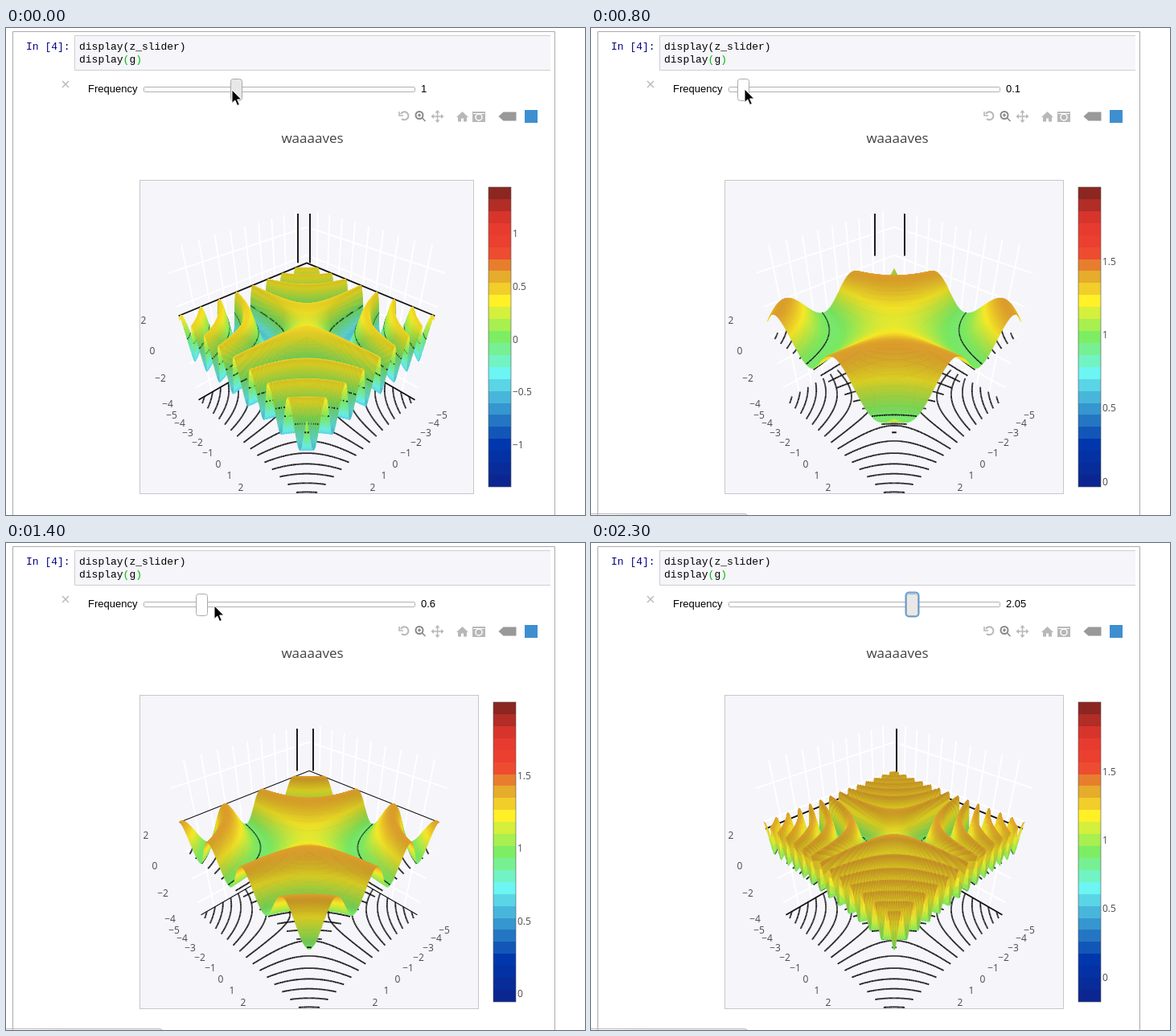
An HTML page with a canvas for the animation above (2.4 s loop, 720 by 606 pixels).

```html
<!DOCTYPE html>
<html lang="en">
<head>
<meta charset="utf-8">
<title>Frequency slider and 3D waves</title>
<style>
html, body { margin: 0; width: 720px; height: 606px; overflow: hidden; background: #fff; }
canvas, svg { position: absolute; left: 0; top: 0; display: block; }
.code { font: 13px "Liberation Mono", "Courier New", monospace; white-space: pre; }
.ui { font: 13px "Liberation Sans", Arial, sans-serif; fill: #000; }
.label { font: 12px "Open Sans", sans-serif; fill: #4a4a4a; }
.title { font: 17px "Open Sans", sans-serif; fill: #444; text-anchor: middle; }
.mid { text-anchor: middle; }
.match { fill: #0b0; }
</style>
</head>
<body>
<canvas id="plot" width="720" height="606"></canvas>
<svg width="720" height="606" viewBox="0 0 720 606">
  <path d="M8.5 606V4.5H682.5V606" fill="none" stroke="#ababab"/>
  <rect x="85" y="10" width="592" height="43" fill="#f5f5fa"/>
  <path d="M677 9.5H85.5V52.5H677" fill="none" stroke="#cfcfcf"/>
  <text class="code" x="25" y="27" fill="#000080">In [4]:</text>
  <text class="code" x="91" y="27">display(z_slider)</text>
  <text class="code" x="91" y="43">display<tspan class="match">(</tspan>g<tspan class="match">)</tspan></text>
  <path d="M70 66l8 8m0-8l-8 8" stroke="#bbb" stroke-width="1.5"/>
  <text class="ui" x="102" y="80">Frequency</text>
  <rect x="171.5" y="73.5" width="337" height="6" rx="1" fill="#fff" stroke="#b0b0b0"/>
  <rect id="glow" x="391.5" y="61.5" width="16" height="30" rx="4" fill="none" stroke="#5b9dd9" stroke-width="2"/>
  <rect id="handle" y="63.5" width="14" height="27" rx="3" stroke="#aaa"/>
  <text class="ui" id="value" x="516" y="80"></text>

  <g fill="none" stroke="#b8b8b8" stroke-width="2">
    <path d="M491 107a5 5 0 1 1 1 6"/>
    <path d="M489 104v5h5" stroke-width="1.6"/>
    <g stroke="#888"><circle cx="514" cy="108.5" r="4.5"/><path d="M517.5 112l4 4M512 108.5h4M514 106.5v4" stroke-width="1.6"/></g>
    <path d="M530 110h13M536.5 103.500v13" stroke-width="1.5"/>
  </g>
  <g fill="#b8b8b8">
    <path d="M536.5 102l3 3.500h-6zM536.5 118l3-3.500h-6zM528.5 110l3.500-3v6zM544.5 110l-3.500-3v6z"/>
    <path d="M560 111l7.500-7 7.500 7h-2v5.500h-4v-4h-3v4h-4V111z"/>
    <path d="M580 104h16v13h-16z"/>
    <path d="M612.5 110l6-5.500h16v11h-16z" fill="#999"/>
  </g>
  <circle cx="588" cy="111" r="4" fill="#b8b8b8" stroke="#fff" stroke-width="1.5"/>
  <path d="M581 106.500h14" stroke="#fff"/>
  <rect x="645" y="102" width="16" height="16" fill="#3e8fd0"/>
  <text class="title" x="381" y="143">waaaaves</text>

  <g id="labels"></g>
  <path id="status" d="M0 604.500H191q4 0 4 4" fill="#eee" stroke="#bbb"/>
  <path id="cursor" d="M0 0V16.500L3.800 13L6.600 19.500L9.400 18.300L6.600 12H11.800Z" fill="#000" stroke="#fff"/>
</svg>
<script>
const $ = id => document.getElementById(id);
const ctx = $('plot').getContext('2d');
const LOOP = 2400, STEP = 100, N = 150;
const TOP = 190, BOTTOM = 579, LEFT = 166, MID_Y = 385;
const BAR = { y: 198, h: 373, bands: 25 };
const FLOOR = -5.1, CEIL = 5, SHEET = .05;

// Rows: time, then values, joined linearly.
const sliderKeys = [[0, 1], [100, 1], [300, .8], [600, .3], [900, 0], [1100, 0], [1400, .6], [1900, 1.65], [2300, 2.05]];
const waveKeys = [[0, 1], [200, 1], [300, .95], [600, .45], [1000, 0], [1100, 0], [1400, .45], [1900, 1.15], [2300, 1.7]];
const cursorKeys = [[0, 281, 77], [300, 260, 77], [600, 206, 74], [1000, 176, 78], [1400, 259, 78], [1900, 358, 70], [2300, 399, 74]];
// Rows: start time, offsets of the two corner lines, width and height of the rear edge line.
const traceSteps = [[0, -11, 4, 1.8, 1.41], [200, -11, 1, 1.8, 1.5], [500, -24, 13, 0, 1.95], [1000, -4, 1, 1.6, 1], [1200, -15, 5, 1.1, 1.95], [1700, -15, 5, 1.8, 1.45], [2200, 3, 3, 1.8, 1.55]];
const jet = [[0, 12, 38, 145], [.125, 0, 55, 172], [.375, 108, 245, 242], [.5, 125, 238, 100], [.625, 255, 240, 40],
  [.72, 226, 162, 45], [.8, 238, 66, 48], [.9, 230, 56, 46], [1, 140, 38, 32]];

function lerpRows(rows, t) {
  let i = 1;
  while (i < rows.length - 1 && rows[i][0] < t) i++;
  const a = rows[i - 1], b = rows[i];
  const k = Math.min(1, Math.max(0, (t - a[0]) / (b[0] - a[0])));
  return a.slice(1).map((v, n) => v + (b[n + 1] - v) * k);
}
const snap = v => Math.round(v * 20) / 20;
const rgb = (t, shade = 1) => `rgb(${lerpRows(jet, t).map(c => Math.round(c * shade))})`;

// Perspective view from above the near corner; x and y run from -1 to 1.
function project(x, y, z, cx) {
  const p = (x - y) / 2, q = (x + y) / 2, lift = .0015 + .0273 * z;
  const w = 1 - .2752 * q - lift;
  return [cx + 153 * p / w, MID_Y + (88.8 * q - 641.6 * lift) / w];
}

const grid = i => -1 + 2 * i / N;

// Zero lines of sin(25xy) + cos(25xy), cut into pieces per grid cell.
function levelLines() {
  const cells = [];
  for (let i = 0; i < N; i++) for (let j = 0; j < N; j++) {
    const list = cells[i * N + j] = [];
    const a = grid(i), b = grid(i + 1), c = grid(j), d = grid(j + 1);
    const corners = [[a, c], [b, c], [b, d], [a, d]];
    for (let n = -7; n <= 8; n++) {
      const level = Math.PI * (n - .25) / 25, hits = [];
      corners.forEach(([x0, y0], k) => {
        const [x1, y1] = corners[(k + 1) % 4];
        const u = x0 * y0 - level, v = x1 * y1 - level;
        if ((u < 0) !== (v < 0)) {
          const m = u / (u - v);
          hits.push([x0 + (x1 - x0) * m, y0 + (y1 - y0) * m]);
        }
      });
      for (let k = 0; k + 1 < hits.length; k += 2) list.push([hits[k], hits[k + 1]]);
    }
  }
  return cells;
}
const levels = levelLines();

function line(points, color, width) {
  ctx.beginPath();
  points.forEach(([x, y], i) => i ? ctx.lineTo(x, y) : ctx.moveTo(x, y));
  ctx.strokeStyle = color;
  ctx.lineWidth = width;
  ctx.stroke();
}

function drawRoom(cx, [, left, right, width, peak]) {
  const at = (x, y, z) => project(x, y, z, cx);
  const rear = z => [at(-1, 1, z), at(-1, -1, z), at(1, -1, z)];
  for (let u = -.8; u < .9; u += .2) {
    line([at(u, -1, FLOOR), at(u, -1, CEIL + .25)], '#fff', 2);
    line([at(-1, u, FLOOR), at(-1, u, CEIL + .25)], '#fff', 2);
  }
  for (let z = -4; z <= 4; z += 2) line(rear(z), '#fff', 2);
  levels.forEach(list => list.forEach(([a, b]) => line([at(...a, FLOOR), at(...b, FLOOR)], '#111', 1.8)));
  const base = at(-1, -1, peak)[1];
  [left, right].forEach(dx => line([[cx + dx, 231], [cx + dx, base]], '#111', 1.9));
  if (width) {
    line(rear(FLOOR), '#111', width);
    line(rear(peak), '#111', width);
  }
}

function drawSurface(cx, height) {
  const pts = [], zs = [];
  for (let i = 0; i <= N; i++) for (let j = 0; j <= N; j++) {
    const x = grid(i), y = grid(j), z = height(x * y), k = i * (N + 1) + j;
    zs[k] = z;
    pts[k] = project(x, y, z, cx);
  }
  // Diagonal rows from back to front.
  for (let s = 0; s <= 2 * N - 2; s++) {
    for (let i = Math.max(0, s - N + 1); i <= Math.min(s, N - 1); i++) {
      const j = s - i, a = i * (N + 1) + j, b = a + N + 1;
      const quad = [a, b, b + 1, a + 1];
      const z = quad.reduce((sum, k) => sum + zs[k], 0) / 4;
      const marks = () => levels[i * N + j].forEach(([m, n]) =>
        line([project(...m, SHEET, cx), project(...n, SHEET, cx)], '#111', 1.8));
      if (z >= SHEET) marks();
      const drop = (zs[a] - zs[b + 1]) * N / 10;
      const color = rgb(.49 + .115 * z, .97 - .13 * Math.max(0, Math.min(1, drop / 2)));
      ctx.fillStyle = color;
      line([...quad, a].map(k => pts[k]), color, .8);
      ctx.fill();
      if (z < SHEET) marks();
    }
  }
}

function drawBar(x) {
  const h = BAR.h / BAR.bands;
  for (let i = 0; i < BAR.bands; i++) {
    ctx.fillStyle = rgb(1 - i / (BAR.bands - 1));
    ctx.fillRect(x, Math.round(BAR.y + i * h), 28, Math.ceil(h));
  }
  ctx.strokeStyle = '#555';
  ctx.lineWidth = .6;
  ctx.strokeRect(x, BAR.y, 28, BAR.h);
}

function labelMarkup(cx, barX, lo, hi, gap) {
  const out = [];
  const put = (x, y, v, cls = 'label mid') =>
    out.push(`<text class="${cls}" x="${x}" y="${y + 4}">${String(v).replace('-', '−')}</text>`);
  [[-203, 364], [-192, 402], [-182, 436], [-173, 468]].forEach(([dx, y], i) => put(cx + dx, y, 2 - 2 * i));
  [[168, 482], [158, 492], [148, 504], [136, 516], [123, 529], [110, 543], [96, 557], [82, 572]].forEach(([dx, y], i) => {
    put(cx - dx, y, i - 5);
    put(cx + dx, y, i - 5);
  });
  for (let n = Math.ceil(lo / gap); n * gap <= hi + 1e-9; n++) {
    const v = +(n * gap).toFixed(3);
    put(barX + 30, BAR.y + (hi - v) / (hi - lo) * BAR.h + 2, v, 'label');
  }
  return out.join('');
}

function drawPlot(t) {
  const f = snap(lerpRows(waveKeys, t)[0]);
  const first = t < 200, still = f === 0;
  const right = first ? 582 : still ? 576 : 588;
  const cx = (LEFT + right) / 2, barX = right + 18;
  const height = first ? u => Math.sin(25 * u) + Math.cos(25 * u)
                       : u => 1 + Math.sin(25 * f * u);
  const scale = first ? [-1.41, 1.43, .5] : still ? [.969, 1, .005] : [-.02 - .1 * f, 1.995, .5];

  ctx.clearRect(0, 0, 720, 606);
  ctx.fillStyle = '#f5f5fa';
  ctx.fillRect(LEFT, TOP, right - LEFT, BOTTOM - TOP);
  ctx.save();
  ctx.beginPath();
  ctx.rect(LEFT, TOP, right - LEFT, BOTTOM - TOP);
  ctx.clip();
  ctx.lineJoin = 'round';
  drawRoom(cx, traceSteps.filter(row => row[0] <= t).pop());
  drawSurface(cx, height);
  ctx.restore();
  ctx.strokeStyle = '#c8c8c8';
  ctx.lineWidth = 1;
  ctx.strokeRect(LEFT + .5, TOP - .5, right - LEFT - 1, BOTTOM - TOP + 1);
  drawBar(barX);
  $('labels').innerHTML = labelMarkup(cx, barX, ...scale);
}

function drawSlider(t) {
  const v = snap(lerpRows(sliderKeys, t)[0]);
  const focus = t >= 2300, show = on => on ? 'visible' : 'hidden';
  $('value').textContent = v;
  $('handle').setAttribute('x', Math.round(171 + 108 * v) + .5);
  $('handle').setAttribute('fill', focus || t < 100 ? '#e8e8e8' : '#fff');
  $('glow').setAttribute('visibility', show(focus));
  $('cursor').setAttribute('visibility', show(!focus));
  $('cursor').setAttribute('transform', `translate(${lerpRows(cursorKeys, t)})`);
  $('status').setAttribute('visibility', show(t >= 100));
}

const start = performance.now();
let shown = -1;
function tick() {
  const step = Math.floor((performance.now() - start) % LOOP / STEP);
  if (step !== shown) {
    shown = step;
    drawSlider(step * STEP);
    drawPlot(step * STEP);
  }
  requestAnimationFrame(tick);
}
tick();
</script>
</body>
</html>
```
